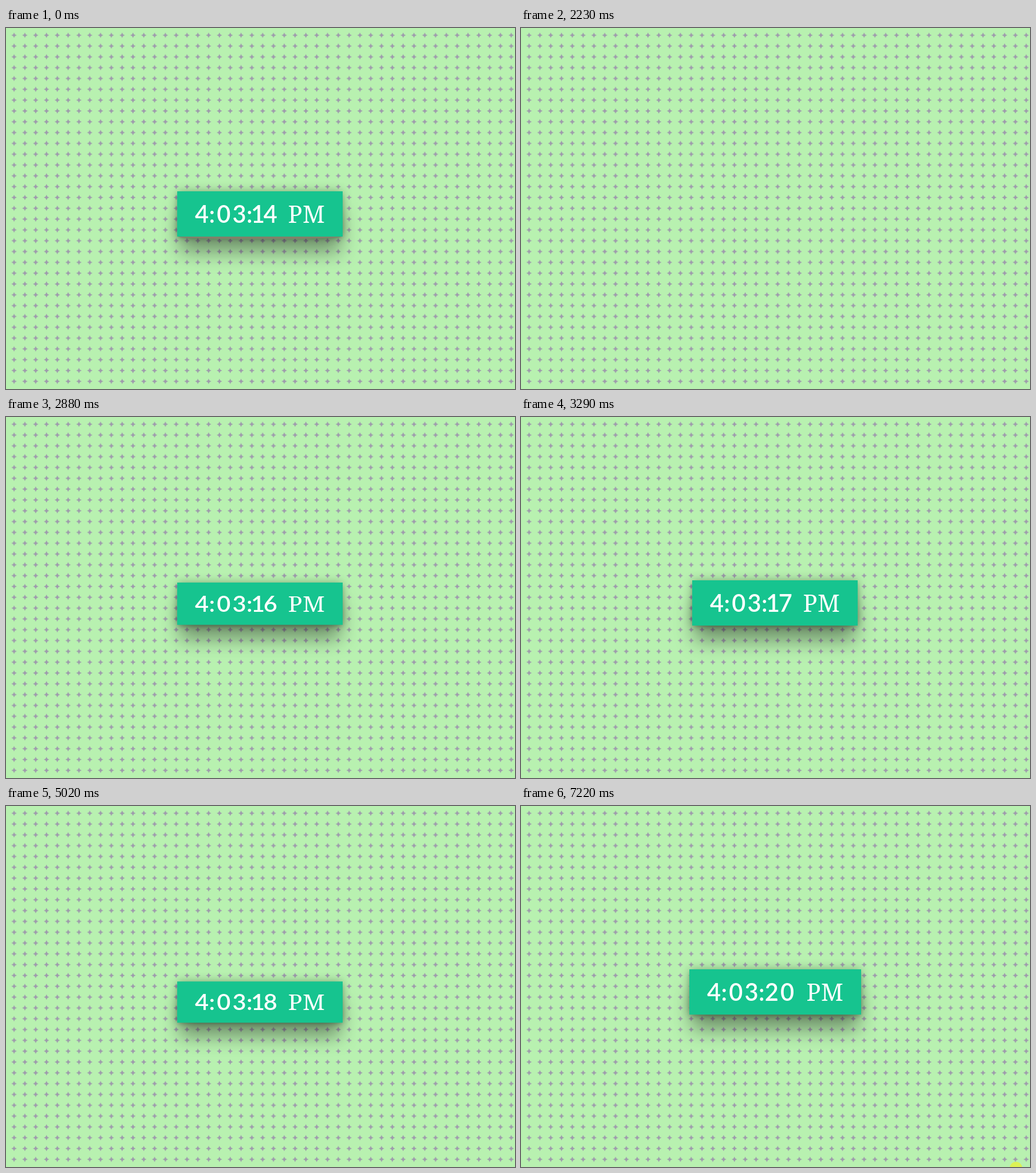
Recreate the animation shown at these times as an HTML page. Size 889 by 630 pixels, loop 7290 ms.

```html
<!DOCTYPE html>
<html lang="en">
<head>
<meta charset="utf-8">
<title>Bouncing clock</title>
<style>
html, body { margin: 0; width: 100%; height: 100%; overflow: hidden; background: #b8f1b0; }
svg { position: absolute; inset: 0; width: 889px; height: 630px; }
#row {
  position: absolute; left: -.7px; top: 284.7px; width: 889px;
  display: flex; justify-content: center;
}
#card {
  position: relative; height: 79px; padding: 0 31px;
  background: #16c48f; color: #fff; white-space: pre;
  font: 600 41.5px/79px Lato, sans-serif;
  letter-spacing: .4px; word-spacing: 7.5px;
  box-shadow: 0 0 16px rgba(0,0,0,.3), 0 3px 8px -2px rgba(0,0,0,.22), 0 31px 34px -4px rgba(0,0,0,.38);
}
#card.rim::after {
  content: ""; position: absolute; top: 100%; left: 2px; right: 2px; height: 4.3px;
  background: #80826a; border-radius: 0 0 100px 100px / 0 0 4px 4px;
}
.wide { margin: 0 2.75px; }
.slim { margin: 0 -2.75px; }
.slab { font: 500 41.5px/1 "Noto Serif", serif; font-stretch: 62.5%; }
#dot {
  position: absolute; left: -11px; top: -11px; width: 22px; height: 22px;
  border-radius: 50%; background: #dcf254;
}
</style>
</head>
<body>
<svg>
  <defs>
    <pattern id="stars" x="9.4" y="7.9" width="18.876" height="18.876" patternUnits="userSpaceOnUse">
      <path transform="scale(.7865)" d="M8 4l4 2-4 2-2 4-2-4-4-2 4-2 2-4z" fill="#9c92ac" fill-opacity=".9"/>
    </pattern>
  </defs>
  <rect width="889" height="630" fill="#b8f1b0"/>
  <rect width="889" height="630" fill="url(#stars)"/>
</svg>
<div id="row"><div id="card"></div></div>
<div id="dot"></div>
<script>
const LOOP = 7290, DROP = 949, STEP = 65, FIRST = 14;
const card = document.getElementById('card');
const dot = document.getElementById('dot');

// Times at which the seconds advance
const ticks = [1040, 2030, 3290, 4160, 5490, 6160];

// The card vanishes at hide, its fall begins at start and is seen from show on
const drops = [
  { hide: 2230, start: 2268, show: 2560 },
  { hide: 4490, start: 4435, show: 4760 }
];

// Pointer spot along quadratic curves
const moves = [
  { from: 110, to: 380, path: [[837, 620], [609, 410], [381, 200]] },
  { from: 5770, to: 6560, path: [[640, 42], [980, 150], [842, 620]] },
  { from: 7220, to: LOOP, path: [[864.5, 632], [864.5, 632], [864.5, 632]] }
];

const pose = (offset, y, scale, opacity = 1) =>
  ({ offset, transform: `translateY(${y}px) scaleY(${scale})`, opacity, easing: 'cubic-bezier(.215,.61,.355,1)' });
const bounce = card.animate([
  pose(0, -3000, 3, 0),
  pose(.6, 25, .9),
  pose(.75, -10, .95),
  pose(.9, 5, .985),
  pose(1, 0, 1)
], { duration: DROP, fill: 'both' });
bounce.pause();

const wrap = (name, text) => `<span class="${name}">${text}</span>`;

let shown;
function setText(sec) {
  if (sec === shown) return;
  shown = sec;
  card.innerHTML = `4:03:${sec} PM`.replace(/0|1|PM/g, part =>
    wrap({ 0: 'wide', 1: 'slim', PM: 'slab' }[part], part));
}

function dropTime(t) {
  const drop = drops.filter(d => t >= d.hide).pop();
  if (!drop) return DROP;
  if (t < drop.show) return 0;
  const k = Math.floor((t - drop.show + 5) / STEP);
  return Math.min(DROP, drop.show - 5 + k * STEP - drop.start);
}

function moveDot(t) {
  const move = moves.find(m => t >= m.from && t < m.to);
  dot.hidden = !move;
  if (!move) return;
  const u = Math.floor((t - move.from) / STEP) * STEP / (move.to - move.from - STEP);
  const v = 1 - Math.min(1, u), w = 1 - v;
  const [a, b, c] = move.path;
  const at = i => v * v * a[i] + 2 * v * w * b[i] + w * w * c[i];
  dot.style.transform = `translate(${at(0)}px, ${at(1)}px)`;
}

const begin = performance.now();
function draw(now) {
  const t = Math.max(0, now - begin) % LOOP;
  setText(FIRST + ticks.filter(time => t >= time).length);
  card.classList.toggle('rim', t < drops[0].hide);
  bounce.currentTime = dropTime(t);
  moveDot(t);
  requestAnimationFrame(draw);
}
draw(begin);
</script>
</body>
</html>
```
